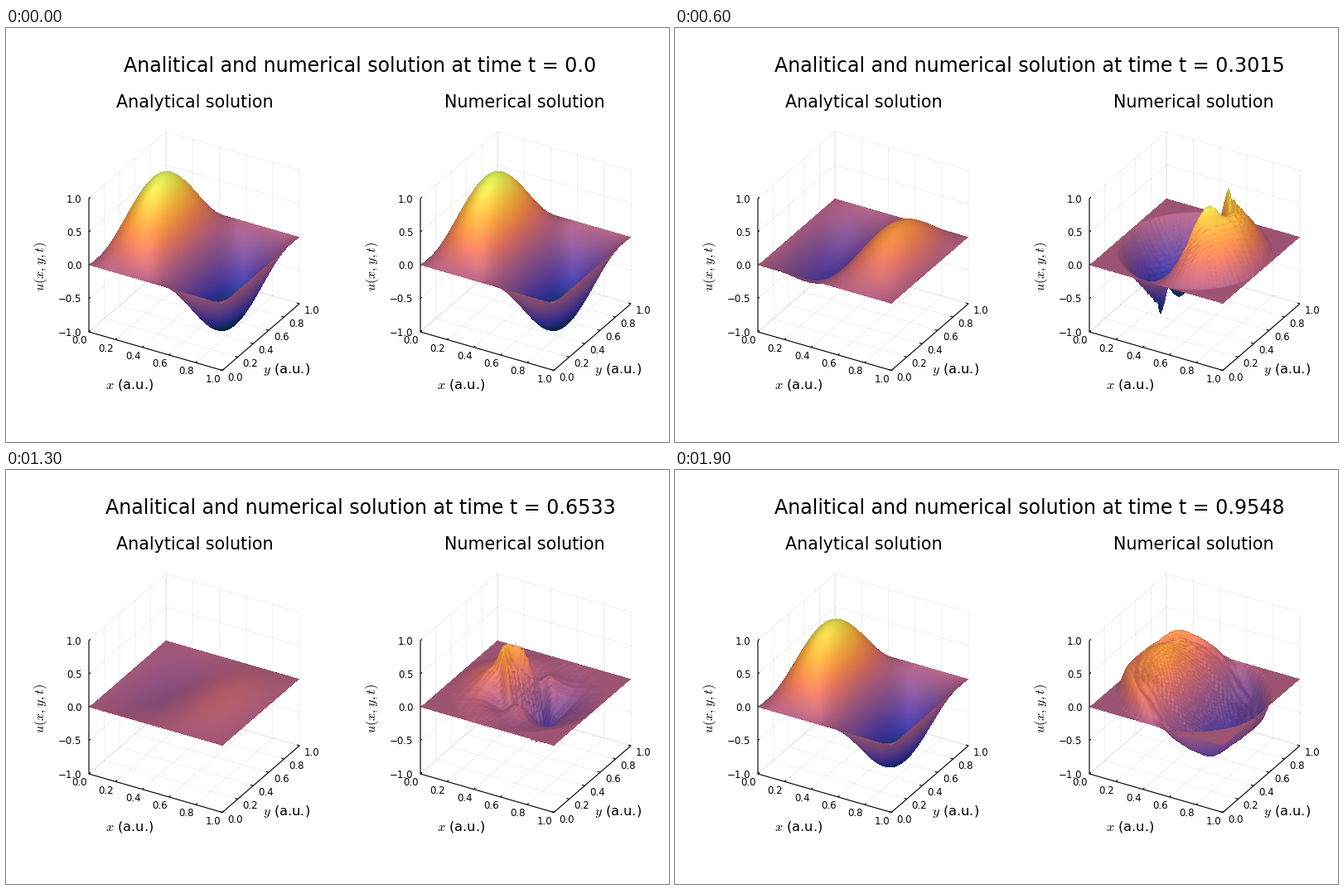
These frames come from a looping animation (800x500 px, 2 s). A matplotlib script:

```python
import numpy as np
import matplotlib.pyplot as plt
from matplotlib.animation import FuncAnimation

W, H = 800, 500
FRAMES, STRIDE, STEPS = 20, 10, 199
N = 100
DT, DX = 1 / STEPS, 1 / (N - 1)

plt.rcParams["font.family"] = "DejaVu Sans"
plt.rcParams["mathtext.fontset"] = "cm"

# screen vectors of the unit box, seen from azimuth 30, elevation 30
SIDE = 186
EX = SIDE * np.array([np.sqrt(3) / 2, 0.25])
EY = SIDE * np.array([0.5, -np.sqrt(3) / 4])
EZ = SIDE * np.array([0, -np.sqrt(3) / 2])
ORIGIN = np.array([100.0, 367.0])

THERMAL = np.array([
    (3, 35, 51), (13, 48, 100), (53, 50, 155), (93, 62, 153),
    (126, 77, 143), (158, 89, 135), (193, 100, 121), (225, 113, 97),
    (246, 139, 69), (251, 173, 60), (246, 211, 70), (231, 250, 90)])

grid = np.linspace(0, 1, N)
X, Y = np.meshgrid(grid, grid)
START = np.sin(2 * np.pi * X) * np.sin(np.pi * Y)


def project(x, y, z, shift=0):
    """Box coordinates (z from -1 to 1) to stage pixels."""
    h = (z + 1) / 2
    return (ORIGIN[0] + shift + x * EX[0] + y * EY[0],
            ORIGIN[1] + x * EX[1] + y * EY[1] + h * EZ[1])


def exact(t):
    return START * np.cos(np.sqrt(5) * np.pi * t)


def solve():
    """Leapfrog wave equation, clamped to zero outside a disc."""
    disc = (X - 0.5) ** 2 + (Y - 0.5) ** 2 < 0.25
    disc[[0, -1]] = False
    disc[:, [0, -1]] = False
    r2 = (DT / DX) ** 2

    def accel(u):
        a = np.zeros_like(u)
        a[1:-1, 1:-1] = (u[2:, 1:-1] + u[:-2, 1:-1] + u[1:-1, 2:]
                         + u[1:-1, :-2] - 4 * u[1:-1, 1:-1])
        return r2 * a

    old, now = START, disc * (START + accel(START) / 2)
    saved = [START]
    for n in range(1, STRIDE * (FRAMES - 1) + 1):
        if n % STRIDE == 0:
            saved.append(now)
        old, now = now, disc * (2 * now - old + accel(now))
    return saved


def triangles():
    """Vertex indices of the mesh, ordered from far to near."""
    j, i = np.meshgrid(np.arange(N - 2, -1, -1), np.arange(N - 1),
                       indexing="ij")
    a = (j * N + i).ravel()
    b, c, d = a + 1, a + N + 1, a + N
    far, near = np.stack((a, c, d), 1), np.stack((a, b, c), 1)
    return np.stack((far, near), 1).reshape(-1, 3)


TRI = triangles()


def shade(u):
    level = np.clip((u + 1) / 2, 0, 1) * (len(THERMAL) - 1)
    steps = np.arange(len(THERMAL))
    base = np.stack([np.interp(level, steps, ch) for ch in THERMAL.T], -1)
    gy, gx = np.gradient(u / 2, DX)
    facing = np.abs(0.5 - 0.433 * gx + 0.75 * gy)
    facing = (facing / np.sqrt(1 + gx ** 2 + gy ** 2))[..., None]
    return base * (0.75 + 0.28 * facing) + 18 * facing ** 6


def paint(image, u, shift):
    """Rasterise the surface, cut off at the box's floor and ceiling."""
    px, py = project(X, Y, u, shift)
    color = shade(u).reshape(-1, 3)
    tx, ty, tz = px.ravel()[TRI], py.ravel()[TRI], u.ravel()[TRI]
    x0 = np.ceil(tx.min(1) - 0.5).astype(int)
    y0 = np.ceil(ty.min(1) - 0.5).astype(int)
    w = np.maximum(np.floor(tx.max(1) - 0.5).astype(int) - x0 + 1, 0)
    h = np.maximum(np.floor(ty.max(1) - 0.5).astype(int) - y0 + 1, 0)

    count = w * h
    owner = np.repeat(np.arange(len(TRI)), count)
    k = np.arange(count.sum()) - np.repeat(np.cumsum(count) - count, count)
    col = x0[owner] + k % w[owner]
    row = y0[owner] + k // w[owner]

    ox, oy = tx[owner, 0], ty[owner, 0]
    bx, by = tx[owner, 1] - ox, ty[owner, 1] - oy
    cx, cy = tx[owner, 2] - ox, ty[owner, 2] - oy
    qx, qy = col + 0.5 - ox, row + 0.5 - oy
    with np.errstate(divide="ignore", invalid="ignore"):
        area = bx * cy - by * cx
        w1 = (qx * cy - qy * cx) / area
        w2 = (bx * qy - by * qx) / area
        weights = np.stack((1 - w1 - w2, w1, w2), 1)
        height = (weights * tz[owner]).sum(1)
        hit = (weights >= -1e-9).all(1) & (np.abs(height) <= 1)
    hit &= (col >= 0) & (col < W) & (row >= 0) & (row < H)

    # the nearest triangle has the highest number
    top = np.full(W * H, -1)
    pixel = row[hit] * W + col[hit]
    np.maximum.at(top, pixel, owner[hit])
    seen = top[pixel] == owner[hit]
    corners = color[TRI[owner[hit][seen]]]
    rgb = (weights[hit][seen][..., None] * corners).sum(1)
    flat = image.reshape(-1, 4)
    flat[pixel[seen], :3] = np.clip(rgb, 0, 255)
    flat[pixel[seen], 3] = 255


fig = plt.figure(figsize=(W / 100, H / 100), dpi=100, facecolor="white")
ax = fig.add_axes([0, 0, 1, 1])
ax.set_xlim(0, W)
ax.set_ylim(H, 0)
ax.axis("off")


def line(points, shift, **style):
    xs, ys = zip(*(project(*p, shift) for p in points))
    ax.plot(xs, ys, snap=False, **style)


def tick_text(x, y, value, ha="center"):
    label = f"{value:.1f}".replace("-", "\u2212")
    ax.text(x, y + 4.3, label, fontsize=8.5, ha=ha, va="baseline")


def draw_box(shift):
    soft = dict(color="black", alpha=0.08, lw=0.6, zorder=1)
    hard = dict(color="black", lw=0.8, zorder=1.5, solid_capstyle="butt")
    for v in np.linspace(0, 1, 6):
        line([(v, 0, -1), (v, 1, -1), (v, 1, 1)], shift, **soft)
        line([(1, v, -1), (0, v, -1), (0, v, 1)], shift, **soft)
        line([(v, 0, -1), (v, 0.02, -1)], shift, **hard)
        line([(1, v, -1), (0.98, v, -1)], shift, **hard)
        x, y = project(v, 0, -1, shift)
        tick_text(x - 11.2, y + 10, v)
        x, y = project(1, v, -1, shift)
        tick_text(x + 15.3, y + 7.8, v)
    for z in np.linspace(-1, 1, 5):
        line([(0, 0, z), (0, 1, z), (1, 1, z)], shift, **soft)
        line([(0, 0, z), (0, 0.02, z)], shift, **hard)
        x, y = project(0, 0, z, shift)
        tick_text(x - 8.7, y + 0.3, z, "right")
    line([(0, 0, 1), (0, 0, -1), (1, 0, -1), (1, 1, -1)], shift, **hard)

    ax.text(shift + 120, 435.7, "$x$ (a.u.)", fontsize=11.7, va="baseline")
    ax.text(shift + 310, 417.2, "$y$ (a.u.)", fontsize=11.7, va="baseline")
    ax.text(shift + 41.6, 288, "$u(x,y,t)$", fontsize=11.7, rotation=90,
            ha="center", va="center")


def heading(x, y, text, size):
    return ax.text(x, y, text, fontsize=size, ha="center", va="baseline")


draw_box(0)
draw_box(400)
heading(227.5, 96.3, "Analytical solution", 14.9)
heading(626.3, 96.3, "Numerical solution", 14.9)
title = heading(427.5, 53, "", 17.08)
surface = ax.imshow(np.zeros((H, W, 4), np.uint8), extent=(0, W, H, 0),
                    interpolation="nearest", aspect="auto", zorder=2)
numeric = solve()


def draw(frame):
    t = frame * STRIDE * DT
    image = np.zeros((H, W, 4), np.uint8)
    paint(image, exact(t), 0)
    paint(image, numeric[frame], 400)
    surface.set_data(image)
    title.set_text("Analitical and numerical solution at time t = "
                   f"{round(t, 4)}")
    return surface, title


anim = FuncAnimation(fig, draw, frames=FRAMES, interval=100, repeat=True)
plt.show()
```
